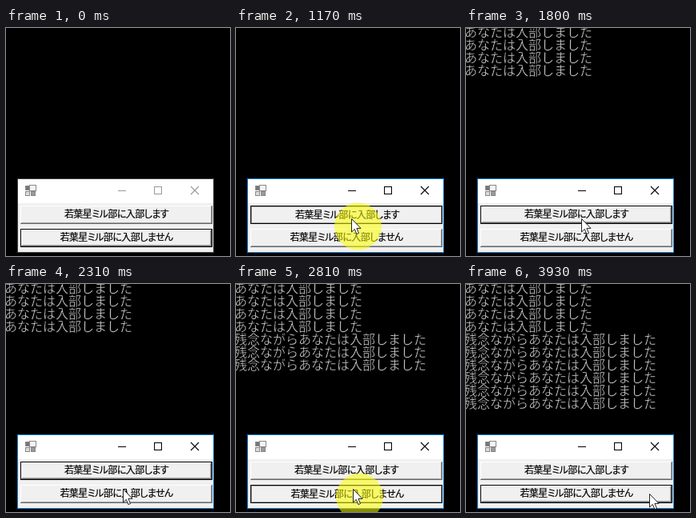
Write an HTML page that moves like this. It is 280 px wide and 285 px high and loops after 4050 ms.

```html
<!DOCTYPE html>
<html lang="ja">
<head>
<meta charset="utf-8">
<style>
  html, body { margin: 0; width: 100%; height: 100%; overflow: hidden; background: #000; }
  svg { display: block; width: 280px; height: 285px; }
  text { font-family: "Noto Sans CJK JP", "Noto Sans CJK", sans-serif; }
  .log text { font-size: 16px; font-weight: 300; fill: #ccc; stroke: #000; stroke-width: .35px; }
  .btn text {
    font-size: 12px; letter-spacing: -.55px; font-feature-settings: "palt";
    text-anchor: middle; stroke: #000; stroke-width: .2px;
  }
</style>
</head>
<body>
<svg viewBox="0 0 280 285">
  <rect width="280" height="285"/>
  <g class="log" id="log"></g>

  <g shape-rendering="crispEdges">
    <rect id="frame" x="14" y="188" width="246" height="93"/>
    <rect x="15" y="189" width="244" height="91" fill="#f0f0f0"/>
    <rect x="15" y="189" width="244" height="30" fill="#fff"/>
    <g stroke="#888">
      <rect x="24.5" y="197.5" width="5" height="5" fill="#777"/>
      <rect x="29.5" y="196.5" width="8" height="7" fill="#f4f4f4"/>
      <rect x="24.5" y="204.5" width="5" height="5" fill="#ddd"/>
      <rect x="31.5" y="204.5" width="5" height="5" fill="#999"/>
    </g>
  </g>
  <g id="controls" fill="none">
    <path d="M140 203.500H150M185.500 198.500H194.500V207.500H185.500Z" shape-rendering="crispEdges"/>
    <path d="M231 198L241 208M241 198L231 208" stroke-width="1.1"/>
  </g>

  <g id="buttons"></g>
  <circle id="glow" r="29.5" fill="#ff0" fill-opacity=".55"/>
  <path id="cursor" d="M.5 .5V17L4.300 13.400L6.900 19.600L9.500 18.500L6.900 12.400H12Z"
        fill="#fff" stroke="#222"/>
</svg>

<script>
const LOOP = 4050, TICK = 125.3, OFFSET = 418;
const ENTER = 130;            // ms, cursor comes into view
const ACTIVATE = 6, SWITCH = 16;  // ticks
const CLICKS_PER_TICK = 0.8;

const $ = id => document.getElementById(id);
const clamp = (v, lo, hi) => Math.min(hi, Math.max(lo, v));

function add(parent, tag, attrs, text = "") {
  const el = document.createElementNS("http://www.w3.org/2000/svg", tag);
  for (const key in attrs) el.setAttribute(key, attrs[key]);
  el.textContent = text;
  return parent.appendChild(el);
}

function makeButton(y, label, firstClick, clicks) {
  const g = add($("buttons"), "g", { class: "btn", transform: `translate(18 ${y})` });
  const edges = add(g, "g", { fill: "none", "shape-rendering": "crispEdges" });
  const edge = () => add(edges, "path", {});
  return {
    firstClick, clicks,
    light: edge(), shade: edge(), dark: edge(), rim: edge(),
    text: add(g, "text", { y: 15 }, label)
  };
}

const buttons = [
  makeButton(222, "若葉星ミル部に入部します", 5.4, 4),
  makeButton(251, "若葉星ミル部に入部しません", 15, 6)
];
const [join, decline] = buttons;

const lines = Array.from({ length: join.clicks + decline.clicks }, (_, i) =>
  add($("log"), "text", { x: -2, y: 11 + 16 * i },
    (i < join.clicks ? "" : "残念ながら") + "あなたは入部しました"));

const box = d => `M${d + .5} ${d + .5}H${239.5 - d}V${22.5 - d}H${d + .5}Z`;
const topLeft = d => `M${d + .5} ${22 - d}V${d + .5}H${239 - d}`;
const bottomRight = d => `M${d} ${22.5 - d}H${239.5 - d}V${d}`;

function line(el, d, color) {
  el.setAttribute("d", d);
  el.setAttribute("stroke", color);
}

function drawButton(b, focused, down) {
  const d = focused ? 1 : 0;
  line(b.light, down ? "" : topLeft(d), "#fff");
  line(b.shade, down ? box(1) : bottomRight(d + 1), "#a0a0a0");
  line(b.dark, down ? "" : bottomRight(d), "#696969");
  line(b.rim, focused ? box(0) : "", "#000");
  b.text.setAttribute("x", down ? 121 : 120);
  b.text.setAttribute("y", down ? 16 : 15);
}

// Each click holds the mouse for the first half of its cycle, then prints a line.
const cycle = (b, n) => (n - b.firstClick) * CLICKS_PER_TICK;
const printed = (b, n) => clamp(Math.round(cycle(b, n)), 0, b.clicks);
function isDown(b, n) {
  const c = cycle(b, n), part = c - Math.floor(c);
  return c > 0 && c < b.clicks && part > .05 && part < .5;
}

const part = (n, from, to) => clamp((n - from) / (to - from), 0, 1);
const easeOut = (p, power) => 1 - (1 - p) ** power;

function cursorAt(n) {
  const rise = part(n, -1, 5), drop = part(n, 12, 15), leave = part(n, 25, 28);
  return [
    158 - 14 * easeOut(rise, 5) + 2 * drop + 83 * leave,
    274 - 36 * easeOut(rise, 2.2) + 18 * drop + 6 * leave
  ].map(Math.round);
}

function show(el, on) {
  el.setAttribute("visibility", on ? "visible" : "hidden");
}

function draw(t) {
  const n = Math.floor((t - OFFSET) / TICK);
  const [x, y] = cursorAt(n);
  const active = n >= ACTIVATE;
  const focus = active && n < SWITCH ? join : decline;
  const down = isDown(focus, n);
  const count = printed(join, n) + printed(decline, n);

  lines.forEach((el, i) => show(el, i < count));
  buttons.forEach(b => drawButton(b, b === focus, down && b === focus));
  $("frame").setAttribute("fill", active ? "#1883d7" : "#434343");
  $("controls").setAttribute("stroke", active ? "#000" : "#999");
  $("cursor").setAttribute("transform", `translate(${x} ${y})`);
  $("glow").setAttribute("transform", `translate(${x + 8.5} ${y + 10})`);
  show($("cursor"), t >= ENTER);
  show($("glow"), down);
}

const start = performance.now();
function tick() {
  draw((performance.now() - start) % LOOP);
  requestAnimationFrame(tick);
}
tick();
</script>
</body>
</html>
```
